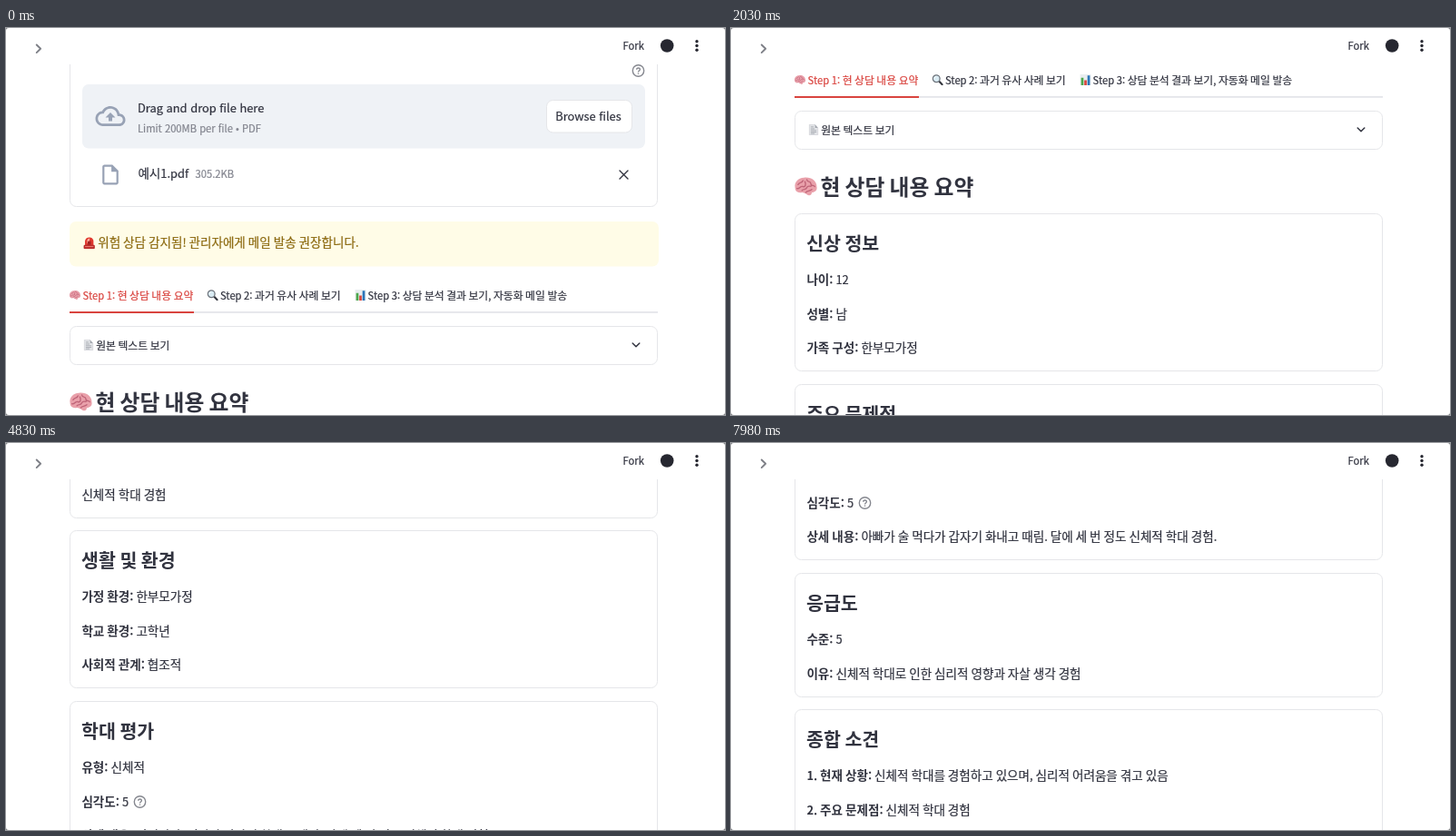
An HTML page for the animation above (8 s loop, 792x426 px).

```html
<!DOCTYPE html>
<html lang="ko">
<head>
<meta charset="utf-8">
<title>상담 요약</title>
<style>
  html, body { margin: 0; width: 100%; height: 100%; overflow: hidden; background: #fff; }
  svg { display: block; width: 792px; height: 426px; }
  text {
    font-family: "Noto Sans CJK KR", "Noto Sans CJK JP", "Noto Sans CJK", sans-serif;
    color: #31333f; fill: currentColor; stroke: currentColor; stroke-width: .22px;
  }
  .mixed { word-spacing: -.05em; }
  .ko { font-size: 1.055em; }
  .b { font-weight: 600; stroke: none; }
  .box { fill: #fff; stroke: #e5e6e9; }
  .line { fill: none; stroke-linecap: round; stroke-linejoin: round; }
</style>
</head>
<body>
<svg viewBox="0 0 792 426">
  <defs>
    <symbol id="brain" viewBox="0 0 24 24">
      <path fill="#e9a0aa" d="M1 13C0 8 4 3 10 3c7-1 13 3 13 9 1 4-2 6-5 6 0 3-3 4-5 2-2-1-3-2-5-2-4 1-7-1-7-5z"/>
      <g fill="none" stroke="#bf6478" stroke-width="1.3" stroke-linecap="round">
        <path d="M4 10c2-3 4-1 5-4M3 14c3 1 3-3 6-2s3-3 2-5M13 5c0 3 4 1 4 4s3 1 4 3M8 16c2-2 4 0 5-3s4 0 5-2M12 18c1-2 4-1 6-3"/>
      </g>
    </symbol>
    <symbol id="siren" viewBox="0 0 24 24">
      <path fill="#e0382f" d="M4 17V9c0-10 16-10 16 0v8z"/>
      <path fill="#ffb3a4" d="M8 8c0-3 3-4 5-4l-2 9H8z"/>
      <path fill="#9d2524" d="M9 9h6v7H9z"/>
      <rect x="1.5" y="16" width="21" height="7.5" rx="2" fill="#b92b2a"/>
      <rect x="4" y="18" width="16" height="2" fill="#e9776c"/>
    </symbol>
    <symbol id="lens" viewBox="0 0 24 24">
      <path d="M15 15l7 7" stroke="#30323a" stroke-width="4" stroke-linecap="round"/>
      <circle cx="9.5" cy="9.5" r="7.5" fill="#d9ebf3" stroke="#6d737b" stroke-width="2.4"/>
      <path d="M5.5 9c0-2 2-4 4-4" fill="none" stroke="#fff" stroke-width="1.6"/>
    </symbol>
    <symbol id="chart" viewBox="0 0 24 24">
      <rect x="1" y="1" width="22" height="22" fill="#e9edf0"/>
      <path fill="#4ca64c" d="M3 8h5v15H3z"/>
      <path fill="#d9453c" d="M9.500 13h5v10h-5z"/>
      <path fill="#2b74b8" d="M16 3h5v20h-5z"/>
    </symbol>
    <symbol id="page" viewBox="0 0 24 24">
      <path fill="#e3e5e8" stroke="#c3c6cb" d="M3 1h12l6 7v15H3z"/>
      <path fill="#a4a8af" d="M15 1v7h6z"/>
      <path stroke="#8f949c" stroke-width="1.3" d="M6 6h6M6 10h8M6 13.500h12M6 17h12M6 20h8"/>
    </symbol>
    <symbol id="help" viewBox="0 0 16 16">
      <g fill="none" stroke="#85878f" stroke-width="1.4">
        <circle cx="8" cy="8" r="6.2"/>
        <path d="M6.200 6.700c0-2.400 3.700-2.300 3.700-.1 0 1.400-1.900 1.400-1.900 2.900M8 10.500v1.300"/>
      </g>
    </symbol>
  </defs>
  <g id="page-body"></g>
  <g id="bar"></g>
</svg>
<script>
const INK = '#31333f', GREY = '#83858f', RED = '#d9443f', STEEL = '#98a2b5';
// Latin letters of the CJK face run wider than the interface face
const LATIN = 1.117;
const BODY = 14.35, SMALL = 12.5;

const HANGUL = /[가-힣]+/g;
const ko = s => s.replace(HANGUL, m => `<tspan class="ko">${m}</tspan>`);
const label = (x, y, size, inner, color, cls) =>
  `<text x="${x}" y="${y}" class="${cls}" style="font-size:${(size / LATIN).toFixed(2)}px;color:${color}">${inner}</text>`;
const text = (x, y, size, s, color = INK, cls = '') =>
  label(x, y, size, ko(s), color, cls + (s.match(HANGUL) ? ' mixed' : ''));
const icon = (id, cx, cy, size) =>
  `<use href="#${id}" x="${cx - size / 2}" y="${cy - size / 2}" width="${size}" height="${size}"/>`;
const box = (y, h) => `<rect class="box" x="70.5" y="${y}" width="647" height="${h}" rx="7"/>`;
const line = (d, color, w) => `<path class="line" d="${d}" stroke="${color}" stroke-width="${w}"/>`;

// A row with everything up to its colon in bold
function field(s, y) {
  const cut = s.indexOf(':') + 1;
  const inner = `<tspan class="b">${ko(s.slice(0, cut))}</tspan>${ko(s.slice(cut))}`;
  return label(83.4, y, BODY, inner, INK, 'mixed');
}

function card([top, title, ...rows]) {
  const h = Math.round(98.4 + 37.5 * (rows.length - 1));
  return box(top, h) + text(83, top + 40.8, 21.8, title, INK, 'b') +
    rows.map((r, i) => field(r, top + 77.8 + 37.4 * i)).join('');
}

const cards = [
  [441.5, '신상 정보', '나이: 12', '성별: 남', '가족 구성: 한부모가정'],
  [629.5, '주요 문제점', '신체적 학대 경험'],
  [741.5, '생활 및 환경', '가정 환경: 한부모가정', '학교 환경: 고학년', '사회적 관계: 협조적'],
  [929.5, '학대 평가', '유형: 신체적', '심각도: 5',
    '상세 내용: 아빠가 술 먹다가 갑자기 화내고 때림. 달에 세 번 정도 신체적 학대 경험.'],
  [1117.5, '응급도', '수준: 5', '이유: 신체적 학대로 인한 심리적 영향과 자살 생각 경험'],
  [1267.5, '종합 소견', '1. 현재 상황: 신체적 학대를 경험하고 있으며, 심리적 어려움을 겪고 있음',
    '2. 주요 문제점: 신체적 학대 경험', '']
];

const uploader = box(-60, 256.5) + icon('help', 696.5, 47, 16) +
  '<rect x="84" y="62" width="620" height="70.500" rx="7" fill="#eff2f6"/>' +
  `<path transform="translate(98.500 80.500) scale(1.375)" fill="${STEEL}" d="M19.350 10.040C18.670 6.590 15.640 4 12 4 9.110 4 6.600 5.640 5.350 8.040 2.340 8.360 0 10.910 0 14c0 3.310 2.690 6 6 6h13c2.760 0 5-2.240 5-5 0-2.640-2.050-4.780-4.650-4.960zM19 18H6c-2.210 0-4-1.790-4-4 0-2.050 1.530-3.760 3.560-3.970l1.070-.11.5-.95C8.080 7.140 9.940 6 12 6c2.620 0 4.880 1.860 5.390 4.430l.3 1.500 1.530.11c1.560.1 2.780 1.410 2.780 2.960 0 1.650-1.350 3-3 3zM8 13h2.550v3h2.900v-3H16l-4-4z"/>` +
  text(145, 92.5, BODY, 'Drag and drop file here') +
  text(145, 115, SMALL, 'Limit 200MB per file • PDF', GREY) +
  '<rect class="box" x="595.500" y="79.500" width="94" height="35.500" rx="7"/>' +
  text(605.2, 102, BODY, 'Browse files') +
  `<path transform="translate(101.800 148.300) scale(1.1)" fill="${STEEL}" d="M14 2H6c-1.100 0-2 .9-2 2v16c0 1.100.9 2 2 2h12c1.100 0 2-.9 2-2V8zM6 20V4h7v5h5v11z"/>` +
  text(145.4, 164.5, BODY, '예시1.pdf') + text(208.5, 164.5, SMALL, '305.2KB', GREY) +
  line('M676 157l9 9m0-9l-9 9', INK, 1.4);

const alertBox = '<rect x="70" y="213" width="649" height="49.500" rx="7" fill="#fffce7"/>' +
  icon('siren', 91.7, 236.5, 14) +
  text(101.2, 241, BODY, '위험 상담 감지됨! 관리자에게 메일 발송 권장합니다.', '#8c6a10');

const tabs = '<rect x="70" y="312" width="648" height="1.800" fill="#e4e5ea"/>' +
  `<rect x="70" y="312" width="137" height="2" fill="${RED}"/>` +
  icon('brain', 76, 294, 13) + text(84.6, 298.5, SMALL, 'Step 1: 현 상담 내용 요약', RED) +
  icon('lens', 227.5, 294, 12.5) + text(236, 298.5, SMALL, 'Step 2: 과거 유사 사례 보기') +
  icon('chart', 390.5, 294, 13) + text(398.6, 298.5, SMALL, 'Step 3: 상담 분석 결과 보기, 자동화 메일 발송');

const expander = box(328.5, 42) + icon('page', 91, 349, 12.5) +
  text(99.2, 354, SMALL, '원본 텍스트 보기') + line('M690.200 347l3.800 3.800 3.800-3.800', INK, 1.5);

const title = icon('brain', 82.5, 411.5, 26) + text(98.5, 420.5, 25.2, '현 상담 내용 요약', INK, 'b');

const body = document.getElementById('page-body');
body.innerHTML = uploader + alertBox + tabs + expander + title +
  cards.map(card).join('') + icon('help', 147.5, 1040, 16);

document.getElementById('bar').innerHTML =
  '<rect width="792" height="40" fill="#fff"/>' +
  line('M33.700 18.500l4.400 4.300-4.400 4.300', '#7e8087', 1.9) +
  text(679.5, 23.5, SMALL, 'Fork') +
  '<circle cx="728.200" cy="19.500" r="7.300" fill="#262730"/>' +
  [14.8, 19.5, 24.2].map(y => `<circle cx="761" cy="${y}" r="1.700" fill="#262730"/>`).join('') +
  '<path fill="#77797d" d="M0 0h3Q0 0 0 3zM792 0v3Q792 0 789 0zM0 426v-3Q0 426 3 426zM792 426h-3Q792 426 792 423z"/>';

// Each wheel gesture: start time, then the scroll offset every 70 ms
const STEP = 70, LOOP = 8000;
const gestures = [
  [630, 14, 46, 78, 95, 100],
  [1190, 108, 134, 154, 167, 171],
  [1820, 182, 206, 228, 237],
  [2310, 250, 285, 311, 320],
  [2870, 332, 371, 414, 441, 456, 464, 467],
  [3570, 477, 504, 523, 530],
  [4130, 538, 560, 566],
  [4620, 577, 608, 635, 645],
  [5180, 654, 680, 691],
  [5670, 698, 727, 745, 750],
  [6160, 760, 785, 804, 810],
  [6720, 816, 851, 880, 890],
  [7350, 902, 938, 965, 973],
  [7980, 974]
];

const frame = (t, s) => ({ offset: t / LOOP, transform: `translateY(${-s}px)`, easing: 'steps(1, end)' });
const frames = [frame(0, 0)];
for (const [start, ...offsets] of gestures)
  offsets.forEach((s, i) => frames.push(frame(start + i * STEP, s)));
frames.push(frame(LOOP, 974));
body.animate(frames, { duration: LOOP, iterations: Infinity });
</script>
</body>
</html>
```
